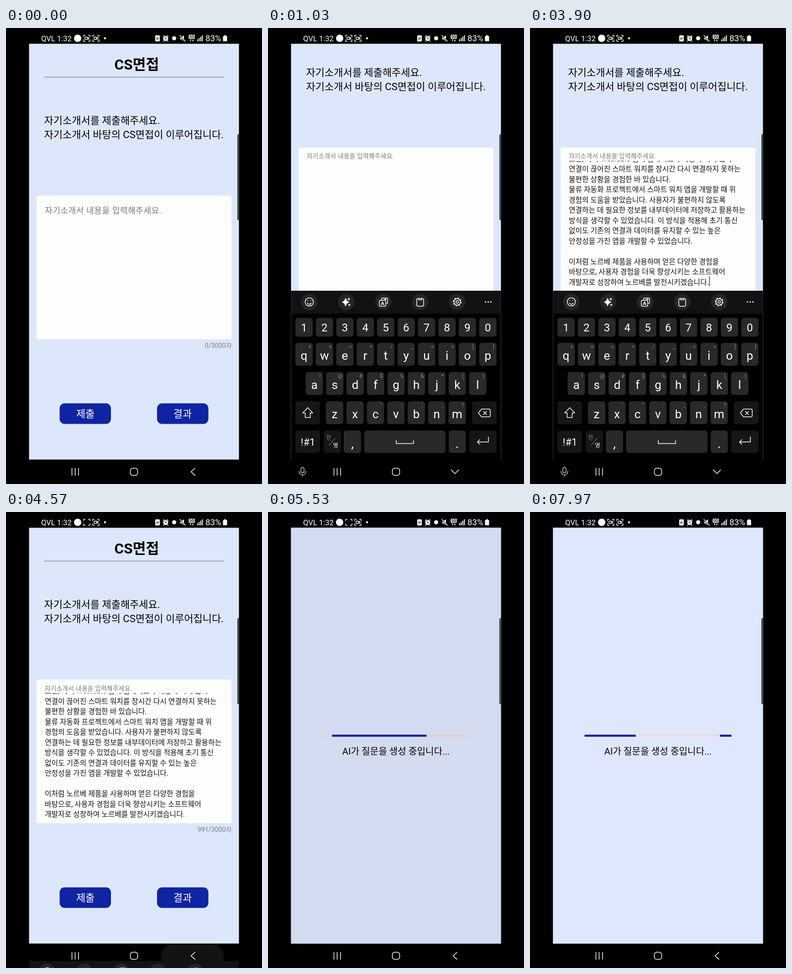
Animation of 561 by 998 pixels, one loop 8 s. Source, as an HTML page:

```html
<!DOCTYPE html>
<html lang="ko">
<head>
<meta charset="utf-8">
<title>CS면접</title>
<style>
  html, body { margin: 0; width: 100%; height: 100%; overflow: hidden; background: #000; }
  svg { display: block; width: 100vw; height: 100vh; }
  text { font-family: Roboto, "Noto Sans CJK KR", "Noto Sans CJK", sans-serif; white-space: pre; }
  .mid { text-anchor: middle; }
  .line { fill: none; stroke: #fff; stroke-width: 1.5; stroke-linecap: round; stroke-linejoin: round; }
  .intro { font-size: 22px; }
  .essay { font-size: 15.82px; fill: #111; }
  .button { fill: #0f24a0; }
  .caption { font-size: 22px; fill: #fff; text-anchor: middle; }
  .key { fill: #29292b; }
  .dark { fill: #161618; }
  .glyph { fill: #fff; text-anchor: middle; }
  .hint { fill: #858587; font-size: 12px; text-anchor: middle; }
</style>
</head>
<body>
<svg viewBox="0 0 561 998" preserveAspectRatio="none">
  <defs>
    <clipPath id="screen"><rect x="50.5" y="34.5" width="460" height="910"/></clipPath>
    <clipPath id="essayArea"><rect x="67" y="396" width="427" height="285"/></clipPath>
    <path id="corners" d="M-7-3v-3.5h3.5M3.5-6.5h3.5v3.5M7 3v3.5h-3.5M-3.5 6.5h-3.5v-3.5"/>
    <path id="camera" d="M-4-2.5h5.5v5h-5.5zM1.5-.5l3-2v5l-3-2"/>
  </defs>
  <rect width="561" height="998"/>

  <g clip-path="url(#screen)">
    <rect x="50" y="34" width="461" height="911" fill="#dde7fc"/>
    <g id="form">
      <text class="mid" x="286.5" y="91" font-size="31.5" font-weight="700">CS면접</text>
      <path d="M84 107.5H477" stroke="#888b9a" stroke-width="1.5"/>
      <text class="intro" x="83.5" y="210">자기소개서를 제출해주세요.</text>
      <text class="intro" x="83.5" y="241.3">자기소개서 바탕의 CS면접이 이루어집니다.</text>
      <path d="M67 681V371q0-4 4-4H490q4 0 4 4V681z" fill="#fefefc"/>
      <text id="label" font-size="18.1" letter-spacing=".56" fill="#77777b">자기소개서 내용을 입력해주세요.</text>
      <g id="essay" clip-path="url(#essayArea)"></g>
      <rect id="caret" width="2" fill="#6350a4"/>
      <circle id="touch" cx="104" cy="411" r="9.7" fill="none" stroke="#b4c1ea" stroke-width="1.4"/>
      <text id="count" x="494.5" y="700" font-size="14.2" fill="#7b808c" text-anchor="end"></text>
      <rect class="button" x="117.5" y="821.5" width="112.5" height="45" rx="11"/>
      <rect class="button" x="331" y="821.5" width="112.5" height="45" rx="11"/>
      <text class="caption" x="174" y="852">제출</text>
      <text class="caption" x="387" y="852">결과</text>
    </g>
    <g id="waiting">
      <rect x="50" y="34" width="461" height="911" fill="#dee7fd"/>
      <rect x="119.5" y="487.3" width="322" height="4.5" fill="#ecdcdf"/>
      <rect id="bar1" y="487.3" height="4.5" fill="#0f24a0"/>
      <rect id="bar2" y="487.3" height="4.5" fill="#0f24a0"/>
      <text class="mid" x="280.5" y="531.3" font-size="20.2">AI가 질문을 생성 중입니다...</text>
      <rect id="scrim" x="50" y="34" width="461" height="911"/>
    </g>
    <path d="M511 232h-1q-3 0-3 4V417q0 4 3 4h1z" fill="#39434a"/>
  </g>

  <rect id="ripple" x="340" y="947" width="137" height="47" rx="23.5" fill="#131313"/>

  <g id="keyboard">
    <rect x="50.5" y="575" width="460" height="423"/>
    <rect x="50.5" y="575" width="460" height="50" fill="#121214"/>
    <g id="keys"></g>
    <g class="line">
      <circle cx="90.5" cy="599.5" r="9"/>
      <path d="M86 602q4.5 5.5 9 0M87.5 596.5v.5M93.5 596.5v.5"/>
      <path fill="#fff" d="M170 592q1.5 6.500 7 8q-5.500 1.500-7 8q-1.500-6.500-7-8q5.500-1.500 7-8z"/>
      <path d="M177 591v5M174.500 593.500h5M178 604v4M176 606h4"/>
      <path d="M249 596v-3q0-2 2-2h9q2 0 2 2v8q0 2-2 2h-1"/>
      <rect x="244" y="596" width="14" height="13" rx="2.5"/>
      <path d="M248 606l3-7l3 7M249 604h4M254 594h5l-2-2"/>
      <rect x="326" y="592" width="15" height="17" rx="3"/>
      <path d="M330 592v3h7v-3"/>
      <circle cx="414.5" cy="599.5" r="2.8"/>
      <circle cx="414.5" cy="599.5" r="7"/>
      <circle cx="414.5" cy="599.5" r="8.5" stroke-dasharray="3.34" stroke-linecap="butt" style="stroke-linecap:butt;stroke-width:2"/>
      <path d="M476.5 599.5h.1M482.5 599.5h.1M488.5 599.5h.1" style="stroke-width:3"/>
      <path d="M87 831l11 11.5h-5.5v10h-11v-10h-5.5z"/>
      <path d="M461 842.5l7-8.500h16q3 0 3 3v11q0 3-3 3h-16zM472 839l7 7M479 839l-7 7"/>
      <path d="M281 903v6.5h38v-6.500M483 895v11h-24M464 901l-5 5l5 5"/>
      <path d="M134 913l13-15" style="stroke:#aaa;stroke-width:1"/>
    </g>
    <text class="hint" x="133" y="901">한</text>
    <text class="glyph" x="148" y="918" font-size="12.5">영</text>
  </g>

  <g class="line">
    <path d="M144.5 963.5v15.5M151.5 963.5v15.5M159 963.5v15.5"/>
    <rect x="272.5" y="963.5" width="16" height="15.5" rx="5"/>
    <path id="back" d="M414 963.5l-8.5 7.7l8.5 7.7"/>
    <g id="typingNav">
      <path d="M401.5 967l8.2 8.2l8.2-8.2"/>
      <rect x="72" y="961.5" width="7" height="12" rx="3.5" style="stroke:#ccc"/>
      <path d="M68 970q1 8 7.5 8t7.5-8M75.5 978v3.5" style="stroke:#ccc"/>
    </g>
  </g>

  <g fill="#fff">
    <text x="77" y="28.5" font-size="16.6">QVL 1:32</text>
    <circle cx="157" cy="22.5" r="8"/>
    <g class="line" style="stroke-width:1.3">
      <use href="#corners" x="177" y="22.5"/>
      <use href="#camera" id="blink" x="177" y="22.5"/>
      <use href="#corners" x="197" y="22.5"/>
      <use href="#camera" x="197" y="22.5"/>
    </g>
    <circle cx="217" cy="22.5" r="2.2"/>
    <rect x="327" y="16" width="10" height="13.5" rx="2"/>
    <path d="M330 25v-3l4-1v3z" stroke="#000"/>
    <circle cx="350" cy="23" r="5.5"/>
    <path d="M344.5 18.5l2.5-2M355.5 18.5l-2.5-2M346 28l-1 1.5M354 28l1 1.5" class="line"/>
    <path d="M350 20v3.5l2 1" fill="none" stroke="#000" stroke-width="1.3"/>
    <circle cx="368.5" cy="22.5" r="4.5"/>
    <path d="M382 20h3l5-4v13l-5-4h-3z"/>
    <path d="M381 17l12 12" stroke="#000" stroke-width="3"/>
    <path d="M381 16l12 13" class="line"/>
    <rect x="400.5" y="14.5" width="13" height="9" rx="1"/>
    <text x="407" y="22" class="mid" font-size="8.5" font-weight="700" fill="#000">5G</text>
    <path d="M404.5 29v-4l-2 2M404.5 25l1.5 1.5M409.5 25v4l-2-2M409.5 29l2-2" class="line" style="stroke-width:1"/>
    <path d="M419 25h2v4h-2zM422.5 22h2v7h-2zM426 19h2v10h-2zM429.5 16h2v13h-2z"/>
    <text x="437" y="29" font-size="18.8">83%</text>
    <path d="M475.5 18.5q0-1 1-1h1.5v-1.5h4v1.5h1.5q1 0 1 1v9q0 1.5-1.5 1.5h-6q-1.5 0-1.5-1.5z"/>
  </g>
</svg>

<script>
const LOOP = 8000;
const $ = id => document.getElementById(id);

function add(parent, tag, attrs, content = '') {
  const node = document.createElementNS('http://www.w3.org/2000/svg', tag);
  for (const name in attrs) node.setAttribute(name, attrs[name]);
  node.textContent = content;
  parent.append(node);
}

function set(id, attrs) {
  for (const name in attrs) $(id).setAttribute(name, attrs[name]);
}

// Essay
`또한, 과거 Wearable 앱이 업데이트가 자동이 되지 않아
연결이 끊어진 스마트 워치를 장시간 다시 연결하지 못하는
불편한 상황을 경험한 바 있습니다.
물류 자동화 프로젝트에서 스마트 워치 앱을 개발할 때 위
경험의 도움을 받았습니다. 사용자가 불편하지 않도록
연결하는 데 필요한 정보를 내부데이터에 저장하고 활용하는
방식을 생각할 수 있었습니다. 이 방식을 적용해 초기 통신
없이도 기존의 연결과 데이터를 유지할 수 있는 높은
안정성을 가진 앱을 개발할 수 있었습니다.

이처럼 노르베 제품을 사용하며 얻은 다양한 경험을
바탕으로, 사용자 경험을 더욱 향상시키는 소프트웨어
개발자로 성장하여 노르베를 발전시키겠습니다.`.split('\n').forEach((line, i) =>
  add($('essay'), 'text', { class: 'essay', x: 85, y: 397.3 + 22.5 * i }, line));

// Keyboard
const PITCH = 44.75;
function addKey(x, y, width, height, style = 'key') {
  add($('keys'), 'rect', { class: style, x, y, width, height, rx: 6 });
}
function addGlyph(x, y, size, label) {
  add($('keys'), 'text', { class: 'glyph', x, y, 'font-size': size }, label);
}
function addRow(letters, hints, x0, y, height, size, baseline) {
  [...letters].forEach((letter, i) => {
    const x = x0 + PITCH * i;
    addKey(x - 19, y, 38, height);
    addGlyph(x, baseline, size, letter);
    if (hints) add($('keys'), 'text', { class: 'hint', x: x + 12.5, y: y + 13 }, hints[i]);
  });
}
for (let i = 0; i < 5; i++)
  add($('keys'), 'circle', { cx: 90.5 + 81 * i, cy: 599.5, r: 18, fill: '#252527' });
addRow('1234567890', '', 79, 634.5, 41, 24, 664);
addRow('qwertyuiop', '+×÷=/_<>[]', 79, 689, 50, 26, 725.5);
addRow('asdfghjkl', '!@#$%&*()', 101.5, 753, 50, 26, 789.5);
addRow('zxcvbnm', '-\'":;,?', 146, 817, 50, 26, 853.5);
addKey(60, 817, 54, 50, 'dark');
addKey(447, 817, 54, 50, 'dark');
addKey(60, 881, 54, 49, 'dark');
addKey(122, 881, 38, 49, 'dark');
addKey(166, 881, 38, 49);
addKey(211, 881, 178, 49);
addKey(396, 881, 37.5, 49);
addKey(441, 881, 60, 49, 'dark');
addGlyph(87.5, 914, 22, '!#1');
addGlyph(185, 919, 28, ',');
addGlyph(414.5, 919, 28, '.');

// Easing
const clamp = v => Math.min(1, Math.max(0, v));
const linear = v => v;
const easeOut = v => 1 - (1 - v) ** 3;
function bezier(x1, y1, x2, y2) {
  const at = (a, b, u) => 3 * (1 - u) ** 2 * u * a + 3 * (1 - u) * u * u * b + u ** 3;
  return x => {
    let low = 0, high = 1;
    for (let i = 0; i < 24; i++) {
      const u = (low + high) / 2;
      if (at(x1, x2, u) < x) low = u; else high = u;
    }
    return at(y1, y2, high);
  };
}
const ramp = (t, start, length, ease = linear) => ease(clamp((t - start) / length));
const between = (t, from, to) => t >= from && t < to;

const slideIn = bezier(.25, 0, .03, 1);
const slideOut = bezier(.4, 0, .6, 1);
const head1 = bezier(.2, 0, .8, 1);
const tail1 = bezier(.4, 0, 1, 1);
const head2 = bezier(0, 0, .65, 1);
const tail2 = bezier(.1, 0, .45, 1);

const SUBMIT = 5030, PASTE = 2900;

function drawBar(id, tail, head) {
  set(id, { x: 119.5 + 322 * tail, width: 322 * Math.max(0, head - tail) });
}

function drawForm(t) {
  const pan = ramp(t, 250, 250, easeOut) - ramp(t, 4270, 250, easeOut);
  set('form', { transform: `translate(0 ${-105.3 * pan})` });

  const float = ramp(t, 60, 150, easeOut);
  set('label', { transform: `translate(85 ${406 - 15.3 * float}) scale(${1 - .252 * float})` });

  const pasted = t >= PASTE;
  const blinkStart = pasted ? PASTE : 370;
  const caretOn = t > 120 && Math.floor(Math.max(0, t - blinkStart) / 500) % 2 === 0;
  set('caret', {
    x: pasted ? 392.3 : 85,
    y: pasted ? 649 : 399.5,
    height: pasted ? 22 : 20.5,
    opacity: +caretOn
  });
  set('essay', { opacity: +pasted });
  set('touch', { opacity: +between(t, 2210, 2720) });
  $('count').textContent = (pasted ? 991 : 0) + '/3000자';
}

function drawKeyboard(t) {
  const shown = ramp(t, 236, 400, slideIn) - ramp(t, 4270, 347, slideOut);
  set('keyboard', { transform: `translate(0 ${423 * (1 - shown)})`, opacity: +(shown > 0) });
  const typing = between(t, 260, 4320);
  set('typingNav', { opacity: +typing });
  set('back', { opacity: +!typing });
  set('ripple', { opacity: ramp(t, 4230, 80) - ramp(t, 4600, 250) });
}

function drawWaiting(t) {
  set('waiting', { opacity: ramp(t, SUBMIT + 20, 280) });
  set('scrim', { opacity: .56 * (1 - ramp(t, SUBMIT + 25, 525)) });
  const c = Math.max(0, t - SUBMIT) % 1800;
  drawBar('bar1', ramp(c, 333, 850, tail1), ramp(c, 0, 750, head1));
  drawBar('bar2', ramp(c, 1267, 533, tail2), ramp(c, 1000, 567, head2));
}

function draw(t) {
  drawForm(t);
  drawKeyboard(t);
  drawWaiting(t);
  const phase = t % 1000;
  set('blink', { opacity: phase < 270 ? 1 : ramp(phase, 690, 120) });
}

const start = performance.now();
function tick() {
  draw((performance.now() - start) % LOOP);
  requestAnimationFrame(tick);
}
tick();
</script>
</body>
</html>
```
